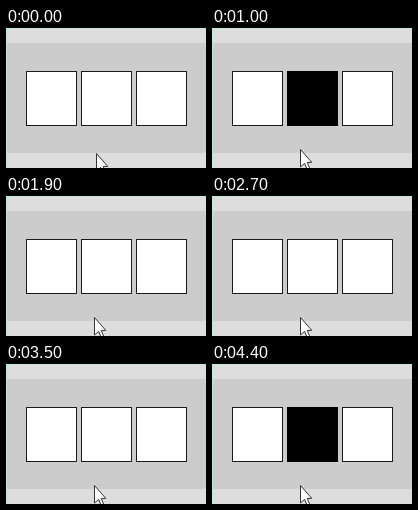
An HTML page with a canvas that plays this animation: 200 by 140 pixels, repeating every 4500 ms.

```html
<!DOCTYPE html>
<html lang="en">
<head>
<meta charset="utf-8">
<style>
  html, body { margin: 0; width: 100%; height: 100%; overflow: hidden; background: #ddd; }
  canvas { display: block; }
</style>
</head>
<body>
<canvas id="stage" width="200" height="140"></canvas>
<script>
const ctx = document.getElementById('stage').getContext('2d');
const LOOP = 4500;
const LEFT = 0, MIDDLE = 1, RIGHT = 2;

// [box, on, off] in ms
const flashes = [
  [LEFT, 200, 500],
  [MIDDLE, 1000, 1200],
  [RIGHT, 1500, 1900],
  [MIDDLE, 2400, 2700],
  [LEFT, 2800, 3100],
  [RIGHT, 3300, 3500],
  [LEFT, 3800, 4100],
  [MIDDLE, 4400, LOOP]
];

const arrow = new Path2D('M.5 .5V18L4.6 14.4L7.2 20.5L9.8 19.4L7.2 13.4H11.8Z');

function rect(x, y, w, h, color) {
  ctx.fillStyle = color;
  ctx.fillRect(x, y, w, h);
}

function drawBox(index, lit) {
  const x = 20 + index * 55;
  rect(x, 43, 51, 55, lit ? '#000' : '#1a1a1a');
  if (!lit) rect(x + 1, 44, 49, 53, '#fff');
}

function drawCursor(time) {
  const step = Math.min(5, Math.floor(time / 100)) / 5;
  ctx.save();
  ctx.translate(Math.round(90 - 2 * step), Math.round(125 - 4 * step));
  ctx.fillStyle = '#fff';
  ctx.fill(arrow);
  ctx.strokeStyle = '#333';
  ctx.lineWidth = 1;
  ctx.lineJoin = 'round';
  ctx.stroke(arrow);
  ctx.restore();
}

function draw(now) {
  const time = now % LOOP;
  rect(0, 0, 200, 140, '#ddd');
  rect(0, 15, 200, 110, '#ccc');
  rect(0, 0, 200, 1, '#bee8e0');
  rect(0, 0, 1, 140, '#bee8e0');
  for (const box of [LEFT, MIDDLE, RIGHT]) {
    drawBox(box, flashes.some(([b, on, off]) => b === box && time >= on && time < off));
  }
  drawCursor(time);
  requestAnimationFrame(draw);
}

draw(performance.now());
</script>
</body>
</html>
```
